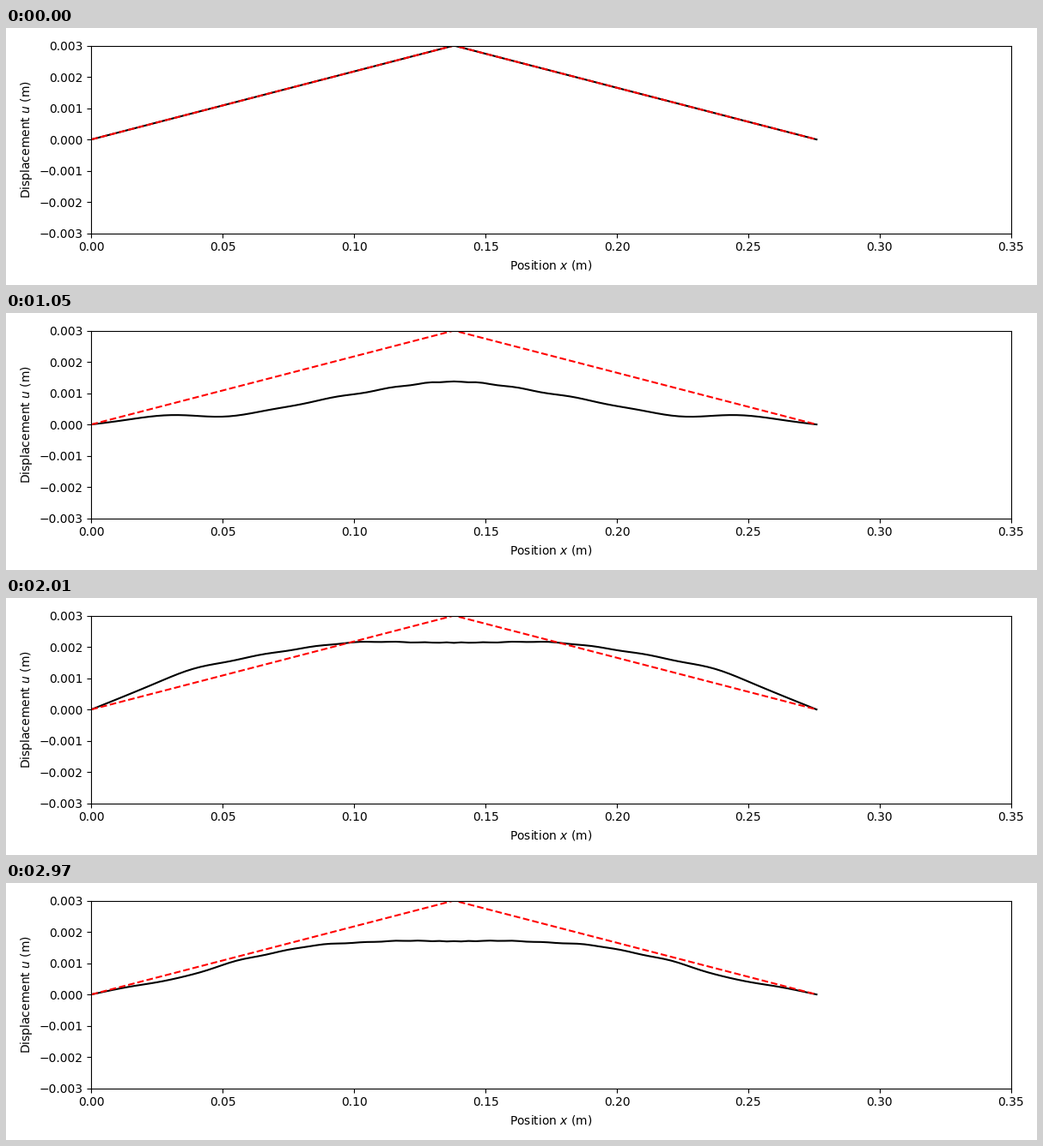
Write a matplotlib script that moves like this. It is 1200 px wide and 300 px high and loops after 3 s.

```python
import numpy as np
import matplotlib.pyplot as plt
from matplotlib.animation import FuncAnimation

LENGTH = 0.276        # string length (m)
PLUCK = 0.003         # height of the pluck (m)
CELLS = 100
FRAMES = 100
STEPS = 10            # time steps per frame
RATE = 2.4724         # tan(w dt / 2) of the lowest mode

x = np.linspace(0, LENGTH, CELLS + 1)
start = PLUCK * (1 - np.abs(2 * x / LENGTH - 1))

# Sine modes of the plucked string, advanced with the trapezoidal rule
n = np.arange(1, CELLS)
modes = np.sin(np.pi * np.outer(x / LENGTH, n))
weights = 2 / CELLS * (start @ modes)
stretch = np.sin(n * np.pi / (2 * CELLS)) / np.sin(np.pi / (2 * CELLS))
turn = 2 * np.arctan(RATE * stretch)


def shape(frame):
    return modes @ (weights * np.cos(turn * STEPS * frame))


fig, ax = plt.subplots(figsize=(12, 3), dpi=100)
string, = ax.plot(x, start, "k-")
ax.plot(x, start, "r--")
ax.set_xlim(0, 0.35)
ax.set_ylim(-PLUCK, PLUCK)
ax.set_xlabel("Position $x$ (m)")
ax.set_ylabel("Displacement $u$ (m)")
fig.tight_layout()


def init():
    string.set_ydata(start)
    return string,


def update(frame):
    string.set_ydata(shape(frame))
    return string,


anim = FuncAnimation(fig, update, frames=FRAMES, init_func=init,
                     interval=30, repeat=True, repeat_delay=0)
plt.show()
```
